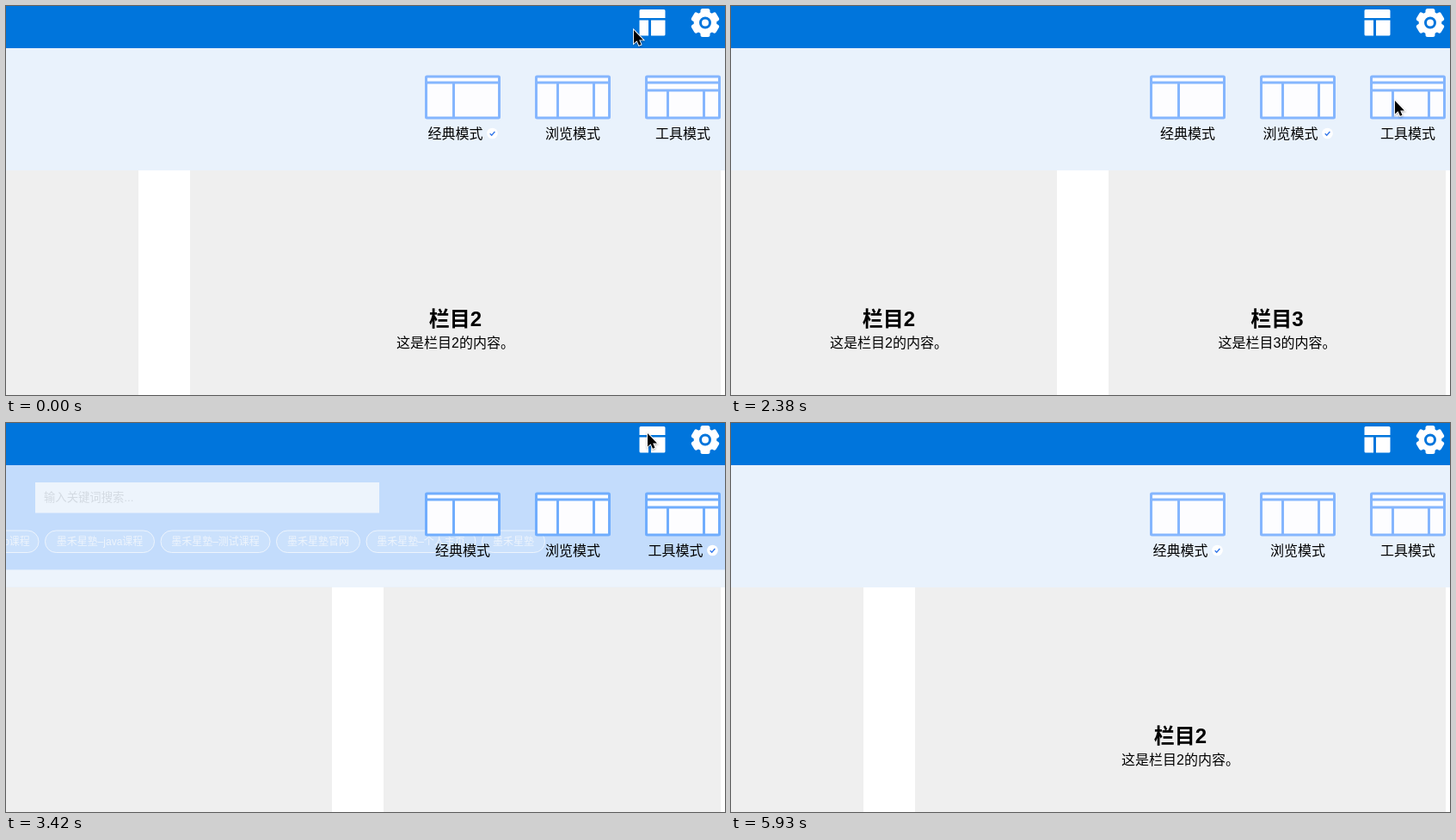
Write an HTML page that moves like this. It is 836 by 452 pixels and loops after 6120 ms.

```html
<!DOCTYPE html>
<html lang="zh-CN">
<head>
<meta charset="utf-8">
<style>
html, body { margin: 0; width: 100%; height: 100%; overflow: hidden; background: #fff; }
svg { display: block; font-family: "Liberation Sans", "Noto Sans CJK SC", "Noto Sans CJK", sans-serif; }
.mid { text-anchor: middle; }
#cursor { filter: drop-shadow(0 1px 1px #0005); paint-order: stroke; }
</style>
</head>
<body>
<svg width="836" height="452" viewBox="0 0 836 452">
  <g id="page"></g>
  <rect width="836" height="49" fill="#0075dc"/>
  <path fill="#fff" d="M736.500 14V5.500q0-1.500 1.500-1.500h27q1.500 0 1.500 1.500V14zM736.500 16.500h10.500v18h-9q-1.500 0-1.500-1.500zM750 16.500h16.500v16.500q0 1.500-1.500 1.500h-15z"/>
  <g id="gear" transform="translate(813 19.500)" fill="#fff"></g>
  <g id="panel"></g>
  <path id="cursor" d="M0 0V15.500L3.600 12.200 6 17.800 8.500 16.800 6.200 11.400H11Z" stroke="#fff" stroke-width="1.800"/>
</svg>
<script>
const LOOP = 6120, TICK = 148.3; // the picture only changes on ticks
const CLASSIC = 0, BROWSE = 1, TOOL = 2;
const el = id => document.getElementById(id);
const rect = (x, y, w, h, attrs) => `<rect x="${x}" y="${y}" width="${w}" height="${h}" ${attrs}/>`;
const text = (x, y, size, s, attrs = 'class="mid"') => `<text x="${x}" y="${y}" font-size="${size}" ${attrs}>${s}</text>`;

const states = [
  { from: 0, mode: CLASSIC, open: true },
  { from: 5, mode: BROWSE }, { from: 11, mode: BROWSE, open: true },
  { from: 18, mode: TOOL }, { from: 23, mode: TOOL, open: true },
  { from: 29, mode: CLASSIC }, { from: 33, mode: CLASSIC, open: true }
];

// pointer rests: tick of arrival, tick of departure, tip position
const rests = [
  [0, 0, 730, 28], [3, 6, 661, 100], [9, 12, 738, 15], [16, 18, 772, 110],
  [21, 24, 746, 12], [27, 29, 528, 122], [33, 34, 734, 25], [40, 42, 820, 480]
];

const brand = '墨禾星塾';
const tags = ['–web课程', '–java课程', '–测试课程', '官网', '–个人主页', ''].map(s => brand + s);

// rows and cols are the dividing lines, measured from the icon's corner
const modes = [
  { name: '经典模式', rows: [9], cols: [33.5] },
  { name: '浏览模式', rows: [9], cols: [26.5, 68.5] },
  { name: '工具模式', rows: [9, 18], cols: [26.5, 68.5] }
];

function column(x, right, top, n) {
  const center = (x + right) / 2, dy = top - 69;
  return rect(x, top, right - x, 452 - top, 'fill="#efefef"') + (n
    ? text(center, 372 + dy, 24, '栏目' + n, 'class="mid" font-weight="bold"') +
      text(center, 397 + dy, 16, `这是栏目${n}的内容。`) : '');
}

function tagRow() {
  let x = -83.5;
  return tags.map(s => {
    const w = 26 + [...s].reduce((sum, c) => sum + (c > '\u3000' ? 12 : 6), 0);
    const tag = rect(x + .5, 125, w - 1, 25.5, 'rx="12.75" fill="#fff" fill-opacity=".2" stroke="#fff"') +
      text(x + w / 2, 142, 12, s, 'class="mid" fill="#fff"');
    x += w + 6.5;
    return tag;
  }).join('');
}

const search = () => rect(0, 49, 836, 121.5, 'fill="#1f80ff"') + rect(34, 69, 400, 35.5, 'fill="#fff"') +
  text(44, 91, 13.333, '输入关键词搜索...', 'fill="#757575"') + tagRow();

function page(mode) {
  if (mode === CLASSIC) return column(-463, 154, 69, 1) + column(214, 831, 69, 2);
  const top = mode === TOOL ? 190 : 69;
  return (mode === TOOL ? search() : '') + column(-12, 379, top, 2) + column(439, 831, top, 3);
}

function option({ name, rows, cols }, i, active) {
  const c = 531 + 128 * i, on = i === active;
  const lines = rows.map(y => `M2 ${y}h84`).join('') + cols.map(x => `M${x} ${rows.at(-1)}V50`).join('');
  return `<g transform="translate(${c - 44} 80)" stroke="${active === TOOL ? '#70adfd' : '#85b6fe'}" stroke-width="3">` +
    rect(1.5, 2, 85, 48, 'rx="1" fill="#fdfdff"') + `<path d="${lines}"/></g>` +
    text(c - (on ? 8.5 : 0), 154, 16, name) +
    (on ? `<g transform="translate(${c + 34.5} 148)"><circle r="6.300" fill="#fff"/>` +
      '<path d="M-2.800 .2L-.8 2.200 2.900-2" fill="none" stroke="#3478ea" stroke-width="1.400"/></g>' : '');
}

const panel = mode => rect(0, 49, 836, 142, `fill="#e9f2fc" fill-opacity="${mode === TOOL ? .81 : 1}"`) +
  modes.map((m, i) => option(m, i, mode)).join('');

function pointer(tick) {
  const i = rests.findLastIndex(r => r[0] <= tick);
  const [, leave, x, y] = rests[i];
  if (tick <= leave) return [x, y];
  const [arrive, , nx, ny] = rests[i + 1];
  const p = (tick - leave) / (arrive - leave), e = p * p * (3 - 2 * p);
  return [x + (nx - x) * e, y + (ny - y) * e];
}

el('gear').innerHTML = '<circle r="13.300"/>' +
  [0, 60, 120].map(a => rect(-5.5, -16.5, 11, 33, `rx="2.500" transform="rotate(${a})"`)).join('') +
  '<circle r="5.500" fill="none" stroke="#0075dc" stroke-width="3"/>';

let shown;

function draw(now) {
  const tick = Math.floor(now % LOOP / TICK + .05);
  const state = states.findLast(s => s.from <= tick);
  if (state !== shown) {
    shown = state;
    el('page').innerHTML = page(state.mode);
    el('panel').innerHTML = state.open ? panel(state.mode) : '';
  }
  el('cursor').setAttribute('transform', `translate(${pointer(tick)})`);
  requestAnimationFrame(draw);
}
draw(0);
</script>
</body>
</html>
```
